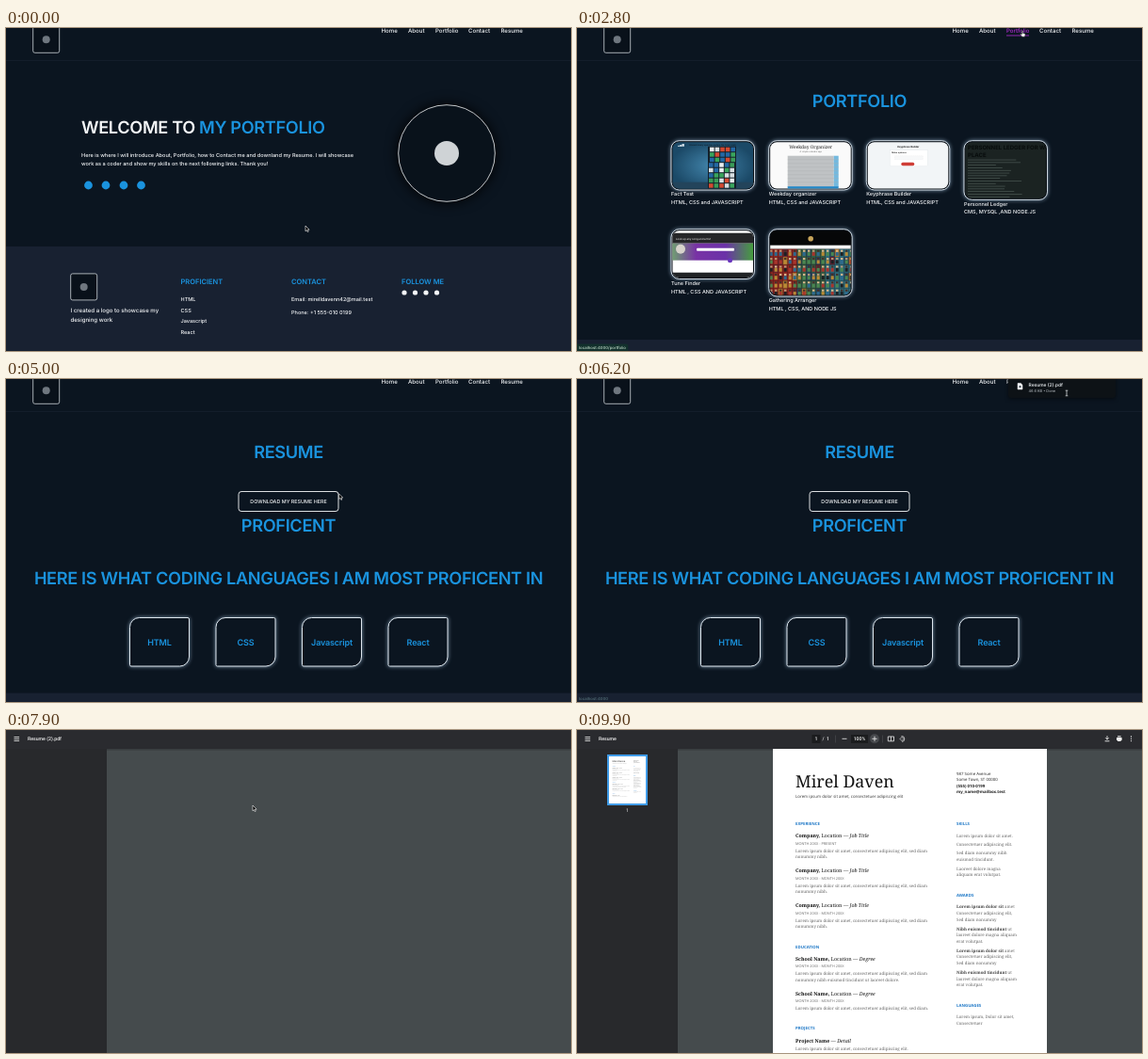
An HTML page that plays this animation: 600 px wide and 343 px high, repeating every 10 s.

```html
<!DOCTYPE html>
<html lang="en">
<head>
<meta charset="utf-8">
<title>Portfolio walkthrough</title>
<style>
html, body { margin: 0; width: 100%; height: 100%; overflow: hidden; background: #0b1520; }
svg { display: block; width: 100vw; height: 100vh; }
text { font-family: Inter, "Open Sans", sans-serif; white-space: pre; text-rendering: geometricPrecision; }
.viewer text { font-family: Roboto, sans-serif; }
.serif text { font-family: "Noto Serif", serif; }
.serif .sans { font-family: "Open Sans", sans-serif; }
.title { font-weight: 600; letter-spacing: -.02em; }
.glow { filter: drop-shadow(0 0 2px #a9c8e2b0); }
</style>
</head>
<body>
<svg id="stage" viewBox="0 0 600 343"></svg>
<script>
const BG = '#0b1520', FOOTER = '#182131', BLUE = '#1a93de', PURPLE = '#b02bd3', WHITE = '#f4f6f8';
const LOOP = 10000;

const rect = (x, y, w, h, fill, extra = '') =>
  `<rect x="${x}" y="${y}" width="${w}" height="${h}" fill="${fill}" ${extra}/>`;
const disc = (x, y, r, fill, extra = '') => `<circle cx="${x}" cy="${y}" r="${r}" fill="${fill}" ${extra}/>`;
const text = (x, y, size, str, fill = WHITE, extra = '') =>
  `<text x="${x}" y="${y}" font-size="${size}" fill="${fill}" ${extra}>${str}</text>`;
const path = (d, stroke, width = 1, fill = 'none') =>
  `<path d="${d}" stroke="${stroke}" stroke-width="${width}" fill="${fill}"/>`;
const group = (id, body, extra = '') => `<g id="${id}" ${extra}>${body}</g>`;
const middle = 'text-anchor="middle"', bold = 'font-weight="700"';
const heading = (y, str) => text(300, y, 18.2, str, BLUE, middle + ' class="title"');
const logoBox = (x, y) =>
  rect(x, y, 28, 28, '#09111a', 'rx="2" stroke="#cdd3d8" stroke-width=".8"') + disc(x + 14, y + 14, 4, '#6f777f');

let seed = 7;
const random = () => (seed = seed * 16807 % 2147483647) / 2147483647;
const pick = list => list[Math.floor(random() * list.length)];

// Site header
const links = [['Home', 398.5, 17], ['About', 427, 17.5], ['Portfolio', 456, 24], ['Contact', 491, 23], ['Resume', 525.5, 23]];
const header = rect(0, 34, 600, .7, '#172230') + logoBox(28.7, -1.7) +
  links.map(([name, x, w]) => group('link' + name,
    text(x, 5.3, 6.1, name, 'currentColor') +
    rect(x, 7.6, w, .8, 'currentColor', 'class="underline"'))).join('');

// Home
const footerColumn = (x, title, items) => text(x, 272, 7.5, title, BLUE, 'font-weight="600"') +
  items.map(([y, str]) => text(x, y, 5.55, str)).join('');
const home =
  text(80, 112.3, 18.2, `WELCOME TO <tspan fill="${BLUE}">MY PORTFOLIO</tspan>`, WHITE, 'class="title"') +
  text(80, 137, 5.6, 'Here is where I will introduce About, Portfolio, how to Contact me and downland my Resume. I will showcase') +
  text(80, 145.5, 5.6, 'work as a coder and show my skills on the next following links. Thank you!') +
  [87.5, 106, 125, 143.5].map(x => disc(x, 167, 4.4, BLUE)).join('') +
  disc(468, 133, 51.3, '#09121b', `stroke="${WHITE}" stroke-width=".8" style="filter:drop-shadow(0 0 7px #000)"`) +
  disc(468, 133, 13, '#cfd3d6') +
  rect(0, 232, 600, 111, FOOTER) + logoBox(68.7, 260.9) +
  text(68.5, 302, 6.1, 'I created a logo to showcase my') + text(68.5, 311.5, 6.1, 'designing work') +
  footerColumn(185.5, 'PROFICIENT', [[290, 'HTML'], [301.5, 'CSS'], [313, 'Javascript'], [324.5, 'React']]) +
  footerColumn(303, 'CONTACT', [[290, 'Email: mirelldavenn42@mail.test'], [304.3, 'Phone: +1 555-010 0199']]) +
  footerColumn(420, 'FOLLOW ME', []) +
  [423, 434.5, 446, 457.5].map(x => disc(x, 281, 2.6, WHITE)).join('');

// Portfolio
function card(x, y, h, picture, title, tools) {
  const id = `clip${x}-${y}`;
  return `<clipPath id="${id}"><rect x="${x + 1.5}" y="${y + 1.5}" width="85.5" height="${h - 3}" rx="7"/></clipPath>` +
    rect(x, y, 88.5, h, '#0a1017', 'rx="8.5" stroke="#e3edf5" stroke-width=".9" class="glow"') +
    `<g clip-path="url(#${id})"><g transform="translate(${x} ${y})">${picture}</g></g>` +
    text(x, y + h + 6.4, 5.5, title) + text(x, y + h + 15, 5.5, tools);
}

const tiles = () => {
  let out = '';
  for (let row = 0; row < 8; row++)
    for (let col = 0; col < 5; col++)
      out += rect(40 + col * 5.6 + (row < 3 ? 1 : 0), 7 + row * 5.5, 4.6, 4.5,
        pick(['#e9eef0', '#d34a32', '#3a9b58', '#39a55d', '#2468a5', '#d8dfe2']));
  return out;
};
const quizPicture = rect(0, 0, 89, 53, 'url(#photo)') + rect(0, 44, 89, 9, '#23445b') +
  rect(39, 6, 30, 45, '#14202a') + tiles() +
  text(7, 5, 3, '▂▄▆', '#dbe6ee') + text(44, 5, 2.3, 'Answer every question before the timer ends', '#101b25', middle);
const plannerPicture = rect(0, 0, 89, 53, '#fafafa') +
  text(44.5, 8.5, 4.9, 'Weekday Organizer', '#222', middle + ' style="font-family:\'Noto Serif\',serif"') +
  text(44.5, 12.5, 2.2, 'A simple calendar app', '#777', middle) +
  rect(20, 16, 49, 33, '#bfc2c4') + rect(69, 16, 5, 33, '#73b9df') + rect(20, 48.5, 54, 5, '#2488c7') +
  [20, 24, 28, 32, 36, 40, 44].map(y => rect(20, y, 54, .4, '#a8acae')).join('');
const phrasePicture = rect(0, 0, 89, 53, '#f2f5f7') +
  text(44.5, 7, 2.6, 'Keyphrase Builder', '#222', middle + ' ' + bold) +
  rect(25, 10, 40, 17, '#fff', 'stroke="#e1e5e8" stroke-width=".4"') +
  text(27, 13.5, 2.2, 'Make a phrase', '#333', bold) +
  rect(30, 16, 30, 4, '#f7f8f9', 'stroke="#ddd" stroke-width=".3" stroke-dasharray="1"') +
  rect(37, 23, 14, 3.5, '#cf3e36', 'rx="1.7"');
const ledgerPicture = rect(0, 0, 89, 64, '#1b2322') +
  text(4, 9, 6, 'PERSONNEL LEDGER FOR WORK', '#080c0c', bold) + text(4, 17, 6, 'PLACE', '#080c0c', bold) +
  Array.from({ length: 15 }, (_, i) => rect(4, 20 + i * 2.8, 28 + random() * 32, .7, '#4b5854', 'stroke-dasharray="2"')).join('');
const musicPicture = rect(0, 0, 89, 54, '#fff') + rect(0, 4, 89, 11, '#252628') +
  text(5, 11, 2.8, 'Look up any song and artist', '#ddd') + rect(0, 15, 89, 18, 'url(#band)') +
  disc(10, 21, 5, '#d7d3cc') + rect(27, 20, 40, 3, '#fff', 'rx="1"') +
  disc(62.5, 33, 2.5, '#6a36bd') + rect(0, 46, 89, 8, '#202325');
const gatheringPicture = rect(0, 0, 89, 71, '#060708') + disc(44.5, 10, 2.8, '#c7a45a') + rect(0, 17, 89, 4, '#f5f5f5') +
  Array.from({ length: 6 * 18 }, (_, i) => {
    const x = i % 18 * 5, y = 21 + Math.floor(i / 18) * 8.4;
    const base = x < 30 ? '#8d2722' : x < 58 ? '#385c45' : '#316b7a';
    return rect(x, y, 5, 8.4, random() < .75 ? base : pick(['#a8722f', '#6b2430', '#27445c'])) +
      rect(x + 1.3, y + 1, 2.4, 2, pick(['#dbb98e', '#b99a7a', '#42302a'])) +
      rect(x + 1, y + 3.4, 3, 3.8, pick(['#a8342c', '#2c698f', '#b98a35', '#1c2023', '#4a8750']));
  }).join('');

const web = 'HTML, CSS and JAVASCRIPT';
const portfolio = heading(83.5, 'PORTFOLIO') +
  card(100, 119.7, 52.3, quizPicture, 'Fact Test', web) +
  card(203.7, 119.7, 52.3, plannerPicture, 'Weekday organizer', web) +
  card(307.3, 119.7, 52.3, phrasePicture, 'Keyphrase Builder', web) +
  card(411, 119.7, 62.7, ledgerPicture, 'Personnel Ledger', 'CMS, MYSQL ,AND NODE.JS') +
  card(100, 213.7, 52.8, musicPicture, 'Tune Finder', 'HTML , CSS AND JAVASCRIPT') +
  card(203.7, 213.7, 71.3, gatheringPicture, 'Gathering Arranger', 'HTML , CSS, AND NODE JS') +
  rect(0, 331, 600, 12, FOOTER);

// Resume
const skill = (x, name) =>
  `<path d="M${x + 10} 253.5h51.5a1.5 1.5 0 0 1 1.5 1.5v40a10 10 0 0 1-10 10h-51.5a1.5 1.5 0 0 1-1.5-1.5v-40a10 10 0 0 1 10-10z"
    fill="${BG}" stroke="#dfe7ee" class="glow"/>` + text(x + 31.5, 282.5, 9, name, BLUE, middle + ' class="title"');
const resume = heading(83.5, 'RESUME') +
  rect(247, 119.5, 106, 21, 'none', `rx="3" stroke="${WHITE}" stroke-width=".9"`) +
  text(300, 132, 5.4, 'DOWNLOAD MY RESUME HERE', WHITE, middle) +
  heading(161.5, 'PROFICENT') + heading(218, 'HERE IS WHAT CODING LANGUAGES I AM MOST PROFICENT IN') +
  skill(131.5, 'HTML') + skill(223, 'CSS') + skill(314.5, 'Javascript') + skill(406, 'React') +
  rect(0, 333.5, 600, 10, FOOTER);

const popup = rect(458, -6, 114, 26, '#0d1216', 'rx="3" style="filter:drop-shadow(0 1px 2px #0008)"') +
  path('M468 4.5h3.2l1.8 1.8v4.7h-5z', WHITE, .5, WHITE) + rect(469.5, 7.2, 2, 2, '#39424a') +
  text(479.5, 8.3, 4.9, 'Resume (2).pdf', '#dfe3e6', 'font-weight="600"') +
  text(479.5, 14.4, 3.9, '46.6 KB • Done', '#a5abb0');

// Document viewer
const viewer = rect(0, 0, 600, 343, '#454b4d') + rect(0, 20, 600, 1.5, '#383d3f') +
  rect(0, 0, 107, 343, '#28292c') + rect(0, 0, 600, 20, '#2a2b2f') +
  [7.2, 9.2, 11.2].map(y => rect(8.5, y, 5.6, .8, '#f1f1f1')).join('');
const ink = '#f1f1f1';
const label = (x, str) => text(x, 11.3, 5.2, str, ink, middle + ' font-weight="500"');
const controls = rect(249.5, 5, 9, 9, '#1b1c1e') + label(254, '1') + label(261.5, '/') + label(266.5, '1') +
  rect(274, 5.5, .5, 8, '#55575a') + path('M281.5 9.3h5', ink, .8) +
  rect(291, 5, 18, 9, '#1b1c1e') + label(300, '100%') +
  disc(316, 9.3, 5, '#47494d') + path('M313.4 9.3h5.2M316 6.7v5.2', ink, .8) + rect(324, 5.5, .5, 8, '#55575a') +
  path('M330.3 7h6.2v4.8h-6.2zM333.4 7v4.8', ink, .8) +
  path('M343 9.5l2-2 2 2-2 2zM344.5 6.5a3 3 0 1 1 .5 6', ink, .7) +
  path('M563 6.3v3.6M561.3 8.4l1.7 1.7 1.7-1.7M560.6 11.8h4.8', ink, .9) +
  rect(573, 8, 5.6, 3, ink) + rect(574, 6.3, 3.6, 1.1, ink) + rect(574, 10, 3.6, 2, ink) +
  [7, 9.3, 11.6].map(y => disc(588.5, y, .65, ink)).join('');

const lorem = 'Lorem ipsum dolor sit amet, consectetuer adipiscing elit';
const section = (x, y, str) => text(x, y, 4.35, str, '#2079c7', 'class="sans" ' + bold);
const body = (x, y, lines, step = 6.6) => lines.map((line, i) => text(x, y + i * step, 4.45, line, '#666')).join('');
const b = str => `<tspan font-weight="700" fill="#444">${str}</tspan>`;
const entry = (y, name, rest, role, date, lines) =>
  text(232, y, 5.3, `<tspan font-weight="700">${name}</tspan>${rest} — <tspan font-style="italic">${role}</tspan>`, '#111') +
  (date ? text(232, y + 7.3, 3.85, date, '#666', 'class="sans"') : '') + body(232, y + (date ? 15.5 : 8.3), lines);
const month = 'MONTH 20XX - MONTH 20XX';
const job = (y, date) => entry(y, 'Company,', ' Location', 'Job Title', date, [lorem + ', sed diam', 'nonummy nibh.']);
const page = rect(208, 20, 291, 377, '#fff') +
  text(232, 61, 17.8, 'Mirel Daven', '#111', 'font-weight="500"') +
  text(232, 72, 4.4, lorem, '#333', 'class="sans"') +
  ['987 Some Avenue', 'Some Town, ST 00000', '(555) 010-0199', 'my_name@mailbox.test'].map((line, i) =>
    text(403, 48.3 + i * 6.1, 4.35, line, '#222', 'class="sans"' + (i > 1 ? ' ' + bold : ''))).join('') +
  section(232, 100.7, 'EXPERIENCE') + job(114.3, 'MONTH 20XX - PRESENT') + job(151.3, month) + job(188.3, month) +
  section(232, 231.5, 'EDUCATION') +
  entry(244.7, 'School Name,', ' Location', 'Degree', month, [lorem + ', sed diam', 'nonummy nibh euismod tincidunt ut laoreet dolore.']) +
  entry(281.7, 'School Name,', ' Location', 'Degree', month, [lorem + ', sed diam.']) +
  section(232, 318, 'PROJECTS') + entry(331.7, 'Project Name', '', 'Detail', '', [lorem + '.']) +
  section(403, 100.7, 'SKILLS') +
  body(403, 113.5, ['Lorem ipsum dolor sit amet.', 'Consectetuer adipiscing elit.'], 9.4) +
  body(403, 132.4, ['Sed diam nonummy nibh', 'euismod tincidunt.']) + body(403, 148.8, ['Laoreet dolore magna', 'aliquam erat volutpat.']) +
  section(403, 176.7, 'AWARDS') +
  body(403, 189.3, [b('Lorem ipsum dolor sit') + ' amet', 'Consectetuer adipiscing elit,', 'Sed diam nonummy']) +
  body(403, 212.5, [b('Nibh euismod tincidunt') + ' ut', 'laoreet dolore magna aliquam', 'erat volutpat.']) +
  body(403, 235.7, [b('Lorem ipsum dolor sit') + ' amet', 'Consectetuer adipiscing elit,', 'Sed diam nonummy']) +
  body(403, 258.9, [b('Nibh euismod tincidunt') + ' ut', 'laoreet dolore magna aliquam', 'erat volutpat.']) +
  section(403, 293.5, 'LANGUAGES') + body(403, 306, ['Lorem ipsum, Dolor sit amet,', 'Consectetuer']);
const loaded = group('page', page, 'class="serif"') + rect(107, 0, 493, 20, '#2a2b2f') + controls +
  rect(33, 27, 41, 52, '#fff', 'stroke="#3f9be8" stroke-width="2"') +
  '<use href="#page" transform="translate(7.3 26.2) scale(.1306)"/>' + text(53.5, 86.5, 5, '1', ink, middle);

const cursors =
  group('arrow', path('M0 0v5.8l1.3-1.2 1 2 .9-.4-.9-2h1.8z', '#fff', .6, '#000')) +
  group('hand', path('M-.5-3q.8-.6 1 .2v2.4l2 .5q.7.4.4 1.5l-.6 1.6h-2.6l-2-2.6q.2-.8 1.8.2z', '#333', .4, '#fff')) +
  group('beam', path('M-1.3-2.8h2.6M0-2.8v5.6M-1.3 2.8h2.6', '#d5d8da', .8));

const stage = document.getElementById('stage');
stage.innerHTML = `<defs>
  <radialGradient id="photo"><stop stop-color="#4386ad"/><stop offset="1" stop-color="#1b4967"/></radialGradient>
  <linearGradient id="band"><stop stop-color="#6fa36f"/><stop offset=".3" stop-color="#7832a5"/>
  <stop offset=".65" stop-color="#6b32a8"/><stop offset="1" stop-color="#43a438"/></linearGradient></defs>` +
  group('site', rect(0, 0, 600, 343, BG) + header + group('home', home) + group('portfolio', portfolio) +
    group('resume', resume) + group('status', rect(-2, 335.5, 0, 10, '#12302c', 'id="statusBox" rx="2"') +
    text(2, 341, 4.3, '', WHITE, 'id="statusText"')) + group('popup', popup), 'font-weight="500"') +
  group('blank', rect(0, 0, 600, 343, '#314f59')) +
  group('viewer', viewer + group('loaded', loaded) + text(23, 11.3, 5.2, '', ink, 'id="docTitle" font-weight="500"'), 'class="viewer"') +
  group('cursor', cursors);

const el = id => document.getElementById(id);
const show = (id, on) => el(id).setAttribute('display', on ? 'inline' : 'none');

// Pointer stops: time, x, y
const stops = [[0, 318, 210], [200, 330, 190], [700, 418, 60], [1000, 434, 5], [2000, 436, 5], [2400, 468, 6], [2800, 473, 6],
  [3200, 474, 6], [3600, 535, 7], [3900, 536, 7], [4400, 500, 85], [5100, 345, 124], [5400, 315, 130], [5700, 314, 130],
  [6100, 515, 18], [6200, 520, 15], [6800, 516, 13], [7500, 516, 13], [7900, 262, 80], [9200, 262, 80], [9700, 590, -10]];
function pointer(t) {
  const i = stops.findIndex(stop => stop[0] > t);
  if (i < 0) return stops[stops.length - 1].slice(1);
  const [t0, x0, y0] = stops[i - 1], [t1, x1, y1] = stops[i];
  const u = (t - t0) / (t1 - t0), ease = u * u * (3 - 2 * u);
  return [x0 + (x1 - x0) * ease, y0 + (y1 - y0) * ease];
}

function render(t) {
  const [x, y] = pointer(t);
  const onSite = t < 6800, inViewer = t >= 7800, ready = t >= 9300;
  const current = t < 2500 ? 'home' : t < 3600 ? 'portfolio' : 'resume';
  ['home', 'portfolio', 'resume'].forEach(name => show(name, name === current));
  show('site', onSite);
  show('blank', !onSite && !inViewer);
  show('viewer', inViewer);
  show('loaded', ready);
  show('popup', t >= 5800);
  el('docTitle').textContent = ready ? 'Resume' : 'Resume (2).pdf';

  let hovered = '';
  for (const [name, left, width] of links) {
    const on = onSite && y < 9 && x >= left && x <= left + width;
    if (on) hovered = name;
    el('link' + name).style.color = on ? PURPLE : WHITE;
    el('link' + name).querySelector('.underline').style.display = on ? '' : 'none';
  }
  const onButton = t < 5900 && current === 'resume' && x > 247 && x < 353 && y > 119 && y < 141;
  const fading = t >= 5900;
  const status = hovered ? 'localhost:4000/' + hovered.toLowerCase() : onButton || fading ? 'localhost:4000' : '';
  el('statusText').textContent = status;
  el('statusText').setAttribute('fill', fading ? '#55717a' : '#c3ddcb');
  el('statusBox').setAttribute('width', status && !fading ? status.length * 2.1 + 6 : 0);

  const kind = t >= 6100 && t < 7800 ? 'beam' : hovered || onButton ? 'hand' : 'arrow';
  ['arrow', 'hand', 'beam'].forEach(name => show(name, name === kind));
  el('cursor').setAttribute('transform', `translate(${x} ${y})`);
}

function tick(now) {
  render(Math.floor(now % LOOP / 100) * 100);
  requestAnimationFrame(tick);
}
render(0);
requestAnimationFrame(tick);
</script>
</body>
</html>
```
